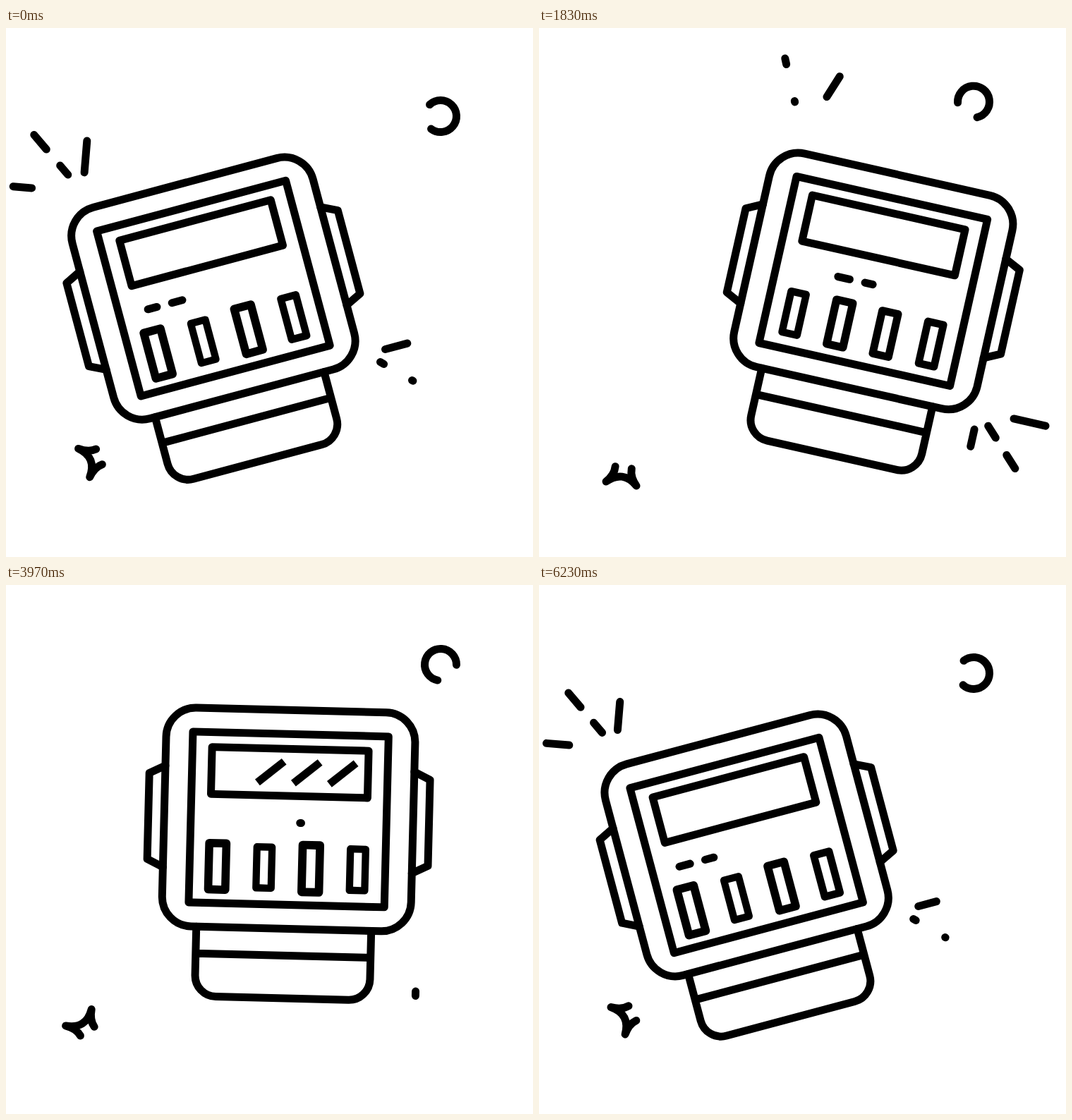
Recreate the animation shown at these times as an HTML page. Size 747 px wide and 750 px high, loop 6260 ms.

```html
<!DOCTYPE html>
<html lang="en">
<head>
<meta charset="utf-8">
<title>Wrist device</title>
<style>
  html, body { margin: 0; width: 100%; height: 100%; overflow: hidden; background: #fff; }
  svg { display: block; width: 100vw; height: 100vh; }
  svg * { fill: none; stroke: #000; stroke-width: 11; stroke-linecap: round; stroke-linejoin: round; }
  #glare line { stroke-linecap: butt; }
</style>
</head>
<body>
<svg viewBox="0 0 747 750">
  <defs>
    <clipPath id="screen"><rect x="-107" y="-96" width="214" height="60"/></clipPath>
  </defs>
  <path id="ring"/>
  <path id="star" d="M-1.3 -11.7Q10.2 -11.1 21.7 -21.7Q1.7 0 21.7 21.7Q10.2 11.1 -1.3 11.7"/>
  <g id="device">
    <path d="M-127 155V223.7a30 30 0 0 0 30 30H91a30 30 0 0 0 30 -30V155M-127 193H121"/>
    <path d="M-176.5 -72L-199 -61V61L-176.5 72M176.5 -72L199 -61V61L176.5 72"/>
    <rect x="-176.5" y="-155" width="353" height="310" rx="42"/>
    <rect x="-138.7" y="-121" width="277.4" height="242"/>
    <g clip-path="url(#screen)"><g id="glare"></g></g>
    <rect x="-111" y="-100" width="222" height="66.7"/>
    <g id="keys"></g>
    <g id="dashes"></g>
  </g>
</svg>
<script>
const LOOP = 6260, FPS = 30, SWING = 47, PULSE = SWING / 2;
const $ = id => document.getElementById(id);

function set(el, attrs) {
  for (const k in attrs) el.setAttribute(k, attrs[k]);
}
function add(parent, tag, attrs = {}) {
  const el = document.createElementNS("http://www.w3.org/2000/svg", tag);
  set(el, attrs);
  return $(parent).appendChild(el);
}

const polar = (x, y, deg, r) => {
  const a = deg * Math.PI / 180;
  return [x + r * Math.cos(a), y + r * Math.sin(a)];
};
const mix = (a, b, k) => a + (b - a) * k;
const smooth = (from, to, v) => {
  const x = Math.min(1, Math.max(0, (v - from) / (to - from)));
  return x * x * (3 - 2 * x);
};
// Eased swing between -1 and 1
const swing = (n, half = SWING) => {
  const x = (n / half) % 2;
  return 2 * smooth(0, 1, x < 1 ? x : 2 - x) - 1;
};

const keys = [], dashes = [];

function addDash(from, to, delay) {
  dashes.push({ el: add("dashes", "line"), from, to, delay });
}
// Two long side rays around a broken middle ray, one after the other
function addBurst(x, y, angle, delay) {
  const ray = (turn, near, far, order) =>
    addDash(polar(x, y, angle + turn, near), polar(x, y, angle + turn, far), delay + 3.1 * order);
  ray(-45, 27, 99, 0);
  ray(0, 22, 50, 1);
  ray(0, 74, 112, 2);
  ray(45, 27, 99, 3);
}

for (let i = 0; i < 4; i++) {
  keys.push(add("keys", "rect", { x: -11.5, y: -31.2, width: 23, height: 62.4 }));
}
for (let i = -1; i < 2; i++) {
  const x = 51 * i - 62;
  addDash([x, 4.7], [x + 29, 4.7], 9.6 * i - 0.9);
  const mid = 24 + 51 * i;
  add("glare", "line", { x1: mid - 18.5, y1: -51.4, x2: mid + 18.5, y2: -82 });
}
addBurst(186, 146.5, 45, 0);
addBurst(-143.5, -179.5, -115.3, -11.6);

function drawDash({ el, from, to, delay }, phase) {
  const head = smooth(0, 18, phase - delay + 8.4);
  const tail = smooth(0, 18, phase - delay - 1);
  set(el, {
    x1: mix(from[0], to[0], tail), y1: mix(from[1], to[1], tail),
    x2: mix(from[0], to[0], head) + 0.01, y2: mix(from[1], to[1], head),
    visibility: head > 0.005 && tail < 0.975 ? "visible" : "hidden"
  });
}

function drawRing(n) {
  const y = 114 - 11 * swing(n), r = 22.5;
  const mid = 130 - 90 * swing(n + 15);
  const end = side => polar(616, y, mid + 50 * side, r).join(" ");
  set($("ring"), { d: `M${end(1)}A${r} ${r} 0 1 1 ${end(-1)}` });
}

function drawStar(n) {
  const drift = swing(n + 11);
  const x = 122.7 - 11.2 * drift, y = 620 + 16 * drift;
  set($("star"), { transform: `translate(${x} ${y}) rotate(${149.5 + 90 * swing(n + 25)})` });
}

function drawDevice(n) {
  const bob = 12.15 * (1 - swing(n, PULSE));
  set($("device"), { transform: `translate(391.2 ${708 + bob}) rotate(${15 * swing(n)}) translate(0 -376)` });

  keys.forEach((el, i) => {
    const size = 1 + 0.07 * Math.cos(2 * Math.PI * (n + 1 - 13.25 * i) / PULSE);
    set(el, { transform: `translate(${66.3 * (i - 1.5)} 69) scale(${size})` });
  });

  const phase = (n + 20) % SWING - 20;
  dashes.forEach(dash => drawDash(dash, phase));
  set($("glare"), { transform: `translate(${mix(-205, 205, smooth(9, 41, n % SWING))} 0)` });
}

const start = performance.now();
function tick() {
  const t = (performance.now() - start) % LOOP;
  const n = Math.floor((t + 4) * FPS / 1000);
  drawDevice(n);
  drawRing(n);
  drawStar(n);
  requestAnimationFrame(tick);
}
tick();
</script>
</body>
</html>
```
